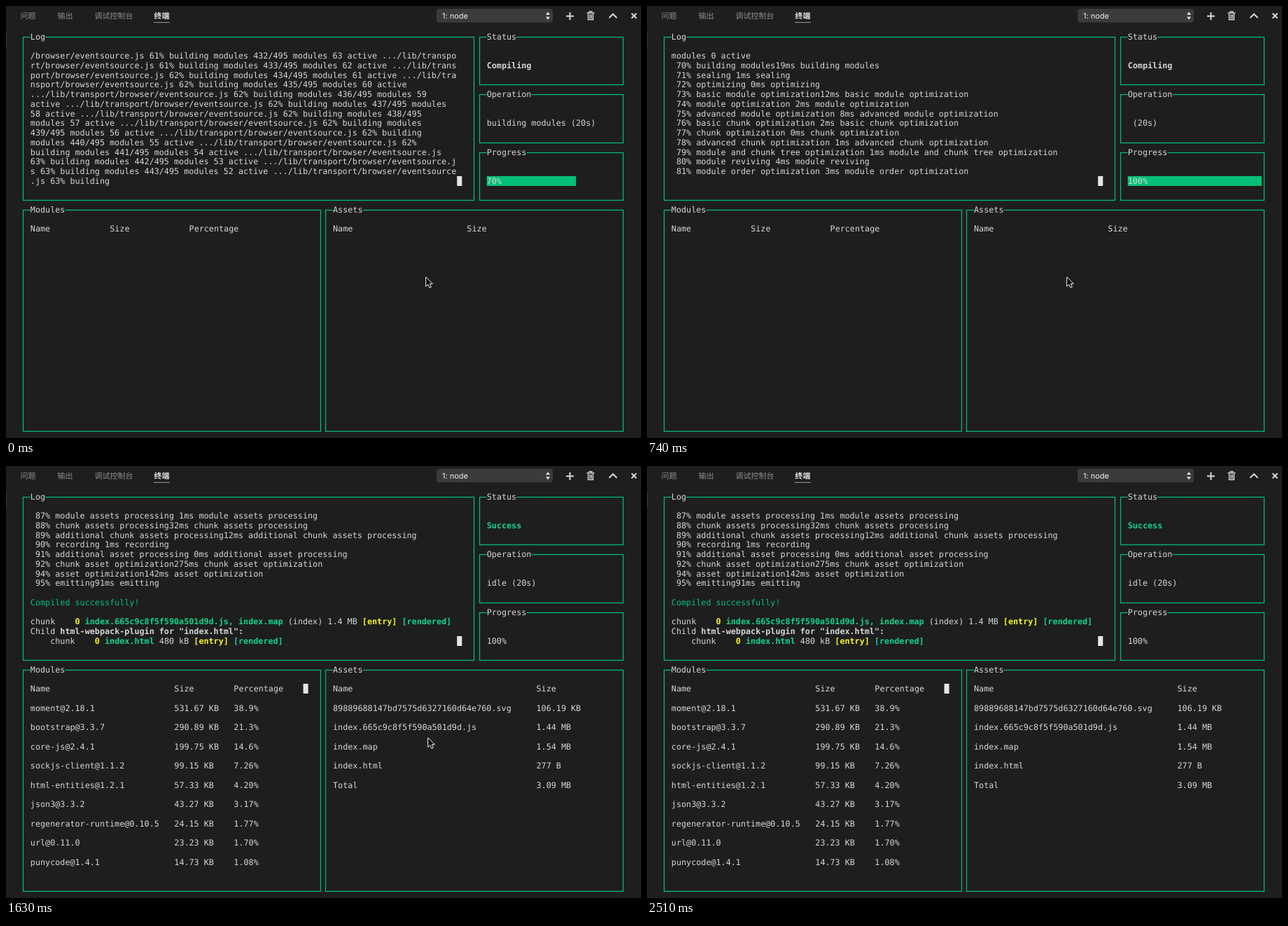
An HTML page that plays this animation: 907 by 617 pixels, repeating every 2.9 s.

```html
<!DOCTYPE html>
<html lang="zh">
<head>
<meta charset="utf-8">
<title>Build dashboard</title>
<style>
  html, body { margin: 0; width: 100%; height: 100%; overflow: hidden; background: #1e1e1e; }
  svg { display: block; }
  text { font: 11.768px "DejaVu Sans Mono", monospace; fill: #d6d6d6; white-space: pre; text-rendering: geometricPrecision; }
  .tab { font: 11px "Noto Sans CJK SC", "Noto Sans CJK", sans-serif; fill: #8e8e8e; }
  .tab.on { font-weight: bold; fill: #e7e7e7; }
  .pick { font: 11px Inter, sans-serif; fill: #f0f0f0; }
  .b { font-weight: bold; }
  .g { fill: #05bf78; }
  .gb { fill: #0fd68c; font-weight: bold; }
  .yb { fill: #f5f520; font-weight: bold; }
  .frame { fill: none; stroke: #05b874; stroke-width: 1.3; }
  .icon { fill: none; stroke: #d8d8d8; stroke-width: 2; }
</style>
</head>
<body>
<svg width="907" height="617" viewBox="0 0 907 617">
  <rect width="907" height="617" fill="#1e1e1e"/>
  <rect y="38" width="1" height="21" fill="#3c3c3c"/>
  <text class="tab" x="20.5" y="18">问题</text>
  <text class="tab" x="73.5" y="18">输出</text>
  <text class="tab" x="126.5" y="18">调试控制台</text>
  <text class="tab on" x="211.5" y="18">终端</text>
  <rect x="211" y="23" width="23" height="1" fill="#9a9a9a"/>
  <rect x="615" y="4" width="166" height="19.5" rx="4" fill="#3b3b3b"/>
  <text class="pick" x="623" y="18">1: node</text>
  <path d="M771 12.5l3-4 3 4zM771 15.5l3 4 3-4z" fill="#e8e8e8"/>
  <path class="icon" d="M800 14.500h11M805.500 9v11"/>
  <path class="icon" d="M829.500 10h11M833 9v-1h4v1M831.500 11v8.500h7v-8.500M834 12v6M836.300 12v6" stroke-width="1.400" style="stroke-width:1.4"/>
  <path class="icon" d="M861.500 17l5.500-5.500 5.500 5.500"/>
  <path class="icon" d="M893.500 10.500l7 7M900.500 10.500l-7 7"/>
  <g id="panels"></g>
  <g id="scene"></g>
  <path id="pointer" d="M.7 1V14.500L3.800 11.600 6 16.500 8.300 15.500 6.200 10.800H10.300Z" fill="#000" stroke="#fff"/>
</svg>
<script>
const LOOP = 2900, CELL = 7.085, LINE = 13.73;
const byId = id => document.getElementById(id);

// Terminal grid: column 0 is the left border, row 0 the first log line.
const colX = col => 20.7 + col * CELL;
const baseline = row => Math.round(75.3 + row * LINE);
const text = (col, row, content, cls = '') =>
  `<text x="${colX(col)}" y="${baseline(row)}" class="${cls}">${content}</text>`;
const block = (col, row, cells, fill) =>
  `<rect x="${colX(col)}" y="${baseline(row) - 11}" width="${cells * CELL}" height="14" fill="${fill}"/>`;
const span = (cls, content) => `<tspan class="${cls}">${content}</tspan>`;
const lines = (col, row, list, step = 1) =>
  list.map((line, i) => text(col, row + i * step, line)).join('');

function panel(title, left, top, right, bottom, titleCol) {
  const edgeX = col => Math.round(colX(col) + 3) + .5;
  const edgeY = row => baseline(row) - 3.5;
  const x = edgeX(left), y = edgeY(top);
  return `<rect class="frame" x="${x}" y="${y}" width="${edgeX(right) - x}" height="${edgeY(bottom) - y}"/>` +
    block(titleCol, top, title.length, '#1e1e1e') + text(titleCol, top, title);
}

byId('panels').innerHTML =
  panel('Log', 0, -2, 91, 15, 2) +
  panel('Status', 92, -2, 121, 3, 94) +
  panel('Operation', 92, 4, 121, 9, 94) +
  panel('Progress', 92, 10, 121, 15, 94) +
  panel('Modules', 0, 16, 60, 39, 2) +
  panel('Assets', 61, 16, 121, 39, 63) +
  block(88, 13, 1, '#e5e5e5');

const eventLog = `/browser/eventsource.js 61% building modules 432/495 modules 63 active .../lib/transpo
rt/browser/eventsource.js 61% building modules 433/495 modules 62 active .../lib/trans
port/browser/eventsource.js 62% building modules 434/495 modules 61 active .../lib/tra
nsport/browser/eventsource.js 62% building modules 435/495 modules 60 active
.../lib/transport/browser/eventsource.js 62% building modules 436/495 modules 59
active .../lib/transport/browser/eventsource.js 62% building modules 437/495 modules
58 active .../lib/transport/browser/eventsource.js 62% building modules 438/495
modules 57 active .../lib/transport/browser/eventsource.js 62% building modules
439/495 modules 56 active .../lib/transport/browser/eventsource.js 62% building
modules 440/495 modules 55 active .../lib/transport/browser/eventsource.js 62%
building modules 441/495 modules 54 active .../lib/transport/browser/eventsource.js
63% building modules 442/495 modules 53 active .../lib/transport/browser/eventsource.j
s 63% building modules 443/495 modules 52 active .../lib/transport/browser/eventsource
.js 63% building`.split('\n');

const socketLog = `/browser/websocket.js 67% building modules 478/496 modules 18 active ...nt/lib/transpo
rt/browser/websocket.js 67% building modules 479/496 modules 17 active ...nt/lib/trans
port/browser/websocket.js 67% building modules 480/496 modules 16 active ...nt/lib/tra
nsport/browser/websocket.js 67% building modules 481/496 modules 15 active ...nt/lib/t
ransport/browser/websocket.js 67% building modules 481/497 modules 16 active
...les/core-js/modules/_enum-bug-keys.js 67% building modules 481/498 modules 17
active ...odules/core-js/modules/_shared-key.js 67% building modules 481/499 modules
18 active ...odules/core-js/modules/_dom-create.js 67% building modules 481/500
modules 19 active ...es/core-js/modules/_ie8-dom-define.js 67% building modules
481/501 modules 20 active ...e-js/modules/_object-keys-internal.js 67% building
modules 481/502 modules 21 active ...modules/core-js/modules/_string-ws.js 67%
building modules 481/503 modules 22 active ...e-js/modules/_array-species-create.js
67% building modules 481/504 modules 23 active ...node_modules/core-js/modules/_path.j
s`.split('\n');

// Each profiled step prints its name before and after the elapsed time.
const steps = list => list.map(([percent, name, ms]) =>
  ` ${percent}% ${name}${String(ms).padStart(2)}ms ${name}`);

const earlySteps = ['modules 0 active', ...steps([
  [70, 'building modules', 19], [71, 'sealing', 1], [72, 'optimizing', 0],
  [73, 'basic module optimization', 12], [74, 'module optimization', 2],
  [75, 'advanced module optimization', 8], [76, 'basic chunk optimization', 2],
  [77, 'chunk optimization', 0], [78, 'advanced chunk optimization', 1],
  [79, 'module and chunk tree optimization', 1], [80, 'module reviving', 4],
  [81, 'module order optimization', 3]])];

const lateSteps = steps([
  [82, 'module id optimization', 5], [83, 'chunk reviving', 4],
  [84, 'chunk order optimization', 0], [85, 'chunk id optimization', 17],
  [86, 'hashing', 26], [87, 'module assets processing', 1],
  [88, 'chunk assets processing', 32], [89, 'additional chunk assets processing', 12],
  [90, 'recording', 1], [91, 'additional asset processing', 0],
  [92, 'chunk asset optimization', 275], [94, 'asset optimization', 142], [95, 'emitting', 91]]);

const tags = span('yb', '[entry]') + ' ' + span('gb', '[rendered]');
const doneLog = [...lateSteps.slice(5), '', span('g', 'Compiled successfully!'), '',
  `chunk    ${span('yb', '0')} ${span('gb', 'index.665c9c8f5f590a501d9d.js, index.map')} (index) 1.4 MB ${tags}`,
  `Child ${span('b', 'html-webpack-plugin for "index.html":')}`,
  `    chunk    ${span('yb', '0')} ${span('gb', 'index.html')} 480 kB ${tags}`];

const modules = [
  ['Name', 'Size', 'Percentage'],
  ['moment@2.18.1', '531.67 KB', '38.9%'],
  ['bootstrap@3.3.7', '290.89 KB', '21.3%'],
  ['core-js@2.4.1', '199.75 KB', '14.6%'],
  ['sockjs-client@1.1.2', '99.15 KB', '7.26%'],
  ['html-entities@1.2.1', '57.33 KB', '4.20%'],
  ['json3@3.3.2', '43.27 KB', '3.17%'],
  ['regenerator-runtime@0.10.5', '24.15 KB', '1.77%'],
  ['url@0.11.0', '23.23 KB', '1.70%'],
  ['punycode@1.4.1', '14.73 KB', '1.08%']];
const assets = [
  ['Name', 'Size'],
  ['89889688147bd7575d6327160d64e760.svg', '106.19 KB'],
  ['index.665c9c8f5f590a501d9d.js', '1.44 MB'],
  ['index.map', '1.54 MB'],
  ['index.html', '277 B'],
  ['Total', '3.09 MB']];

const table = (rows, cols) =>
  cols.map((col, i) => lines(col, 18, rows.map(row => row[i]), 2)).join('');

const building = ['building modules (20s)'];
const scenes = [
  { at: 0, log: eventLog, operation: building, percent: 70, bar: 18 },
  { at: 150, log: socketLog, operation: building, percent: 70, bar: 18 },
  { at: 590, log: socketLog, operation: ['basic module optimization', '(20s)'], percent: 73, bar: 19 },
  { at: 740, log: earlySteps, operation: [' (20s)'], percent: 100, bar: 27 },
  { at: 890, log: lateSteps, operation: [' (20s)'], percent: 100, bar: 27 },
  { at: 1180, log: doneLog, operation: ['idle (20s)'], percent: 100, bar: 0, done: true }];

const pointerStops = [
  { at: 0, x: 599, y: 386 }, { at: 1630, x: 602, y: 387 }, { at: 1780, x: 758, y: 501 },
  { at: 1920, x: 768, y: 517 }, { at: 2070, x: 768, y: 519 }, { at: 2210, x: 827, y: 591 },
  { at: 2360, x: 850, y: 613 }, { at: 2510, x: 920, y: 630 }];

function sceneMarkup({ log, operation, percent, bar, done }) {
  return lines(2, 0, log) +
    text(94, 1, done ? 'Success' : 'Compiling', done ? 'gb' : 'b') +
    lines(94, 8 - operation.length, operation) +
    block(94, 13, bar, '#05c076') + text(94, 13, percent + '%') +
    (done
      ? table(modules, [2, 31, 43]) + table(assets, [63, 104]) + block(57, 18, 1, '#e5e5e5')
      : table(modules.slice(0, 1), [2, 18, 34]) + table(assets.slice(0, 1), [63, 90]));
}

const current = (list, time) => list.findLast(item => item.at <= time);
let shown;

function draw() {
  const time = performance.now() % LOOP;
  const scene = current(scenes, time);
  if (scene !== shown) byId('scene').innerHTML = sceneMarkup(shown = scene);
  const { x, y } = current(pointerStops, time);
  byId('pointer').setAttribute('transform', `translate(${x} ${y})`);
  requestAnimationFrame(draw);
}
draw();
</script>
</body>
</html>
```
